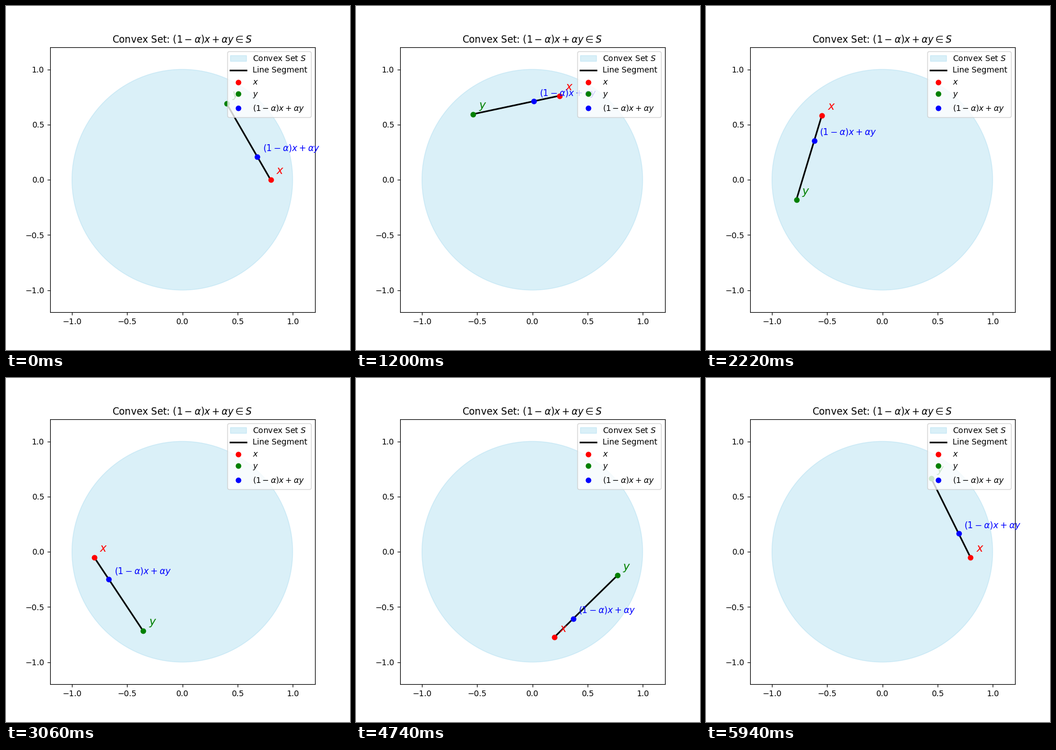
A matplotlib script that plays this animation: 600 by 600 pixels, repeating every 6 s.

```python
import numpy as np
import matplotlib.pyplot as plt
from matplotlib.animation import FuncAnimation

FRAMES = 100
INTERVAL = 60
RADIUS = 0.8
GAP = np.pi / 3      # angle between x and y
ALPHA = 0.3
SHIFT = 0.05         # label offset from its point
MIX = r"$(1-\alpha)x + \alpha y$"

fig, ax = plt.subplots(figsize=(6, 6), dpi=100)
ax.set_xlim(-1.2, 1.2)
ax.set_ylim(-1.2, 1.2)
ax.set_aspect("equal")
ax.set_xticks(np.arange(-1, 1.1, 0.5))
ax.set_yticks(np.arange(-1, 1.1, 0.5))
ax.set_title(r"Convex Set: $(1-\alpha)x + \alpha y \in S$")

ax.add_patch(plt.Circle((0, 0), 1, color="skyblue", alpha=0.3,
                        label="Convex Set $S$"))
segment, = ax.plot([], [], "k-", lw=2, label="Line Segment")


def make_point(color, name, size):
    dot, = ax.plot([], [], "o", color=color, label=name)
    text = ax.text(0, 0, name, color=color, fontsize=size)
    return dot, text


points = [make_point("red", "$x$", 14),
          make_point("green", "$y$", 14),
          make_point("blue", MIX, 11)]
ax.legend(loc="upper right")


def on_orbit(angle):
    return RADIUS * np.array([np.cos(angle), np.sin(angle)])


def update(i):
    angle = 2 * np.pi * i / FRAMES
    x = on_orbit(angle)
    y = on_orbit(angle + GAP)
    mix = (1 - ALPHA) * x + ALPHA * y
    segment.set_data([x[0], y[0]], [x[1], y[1]])
    for (dot, text), pos in zip(points, (x, y, mix)):
        dot.set_data([pos[0]], [pos[1]])
        text.set_position(pos + SHIFT)
    return [segment] + [artist for pair in points for artist in pair]


anim = FuncAnimation(fig, update, frames=FRAMES, interval=INTERVAL,
                     repeat=True, repeat_delay=0, blit=False)
plt.show()
```
